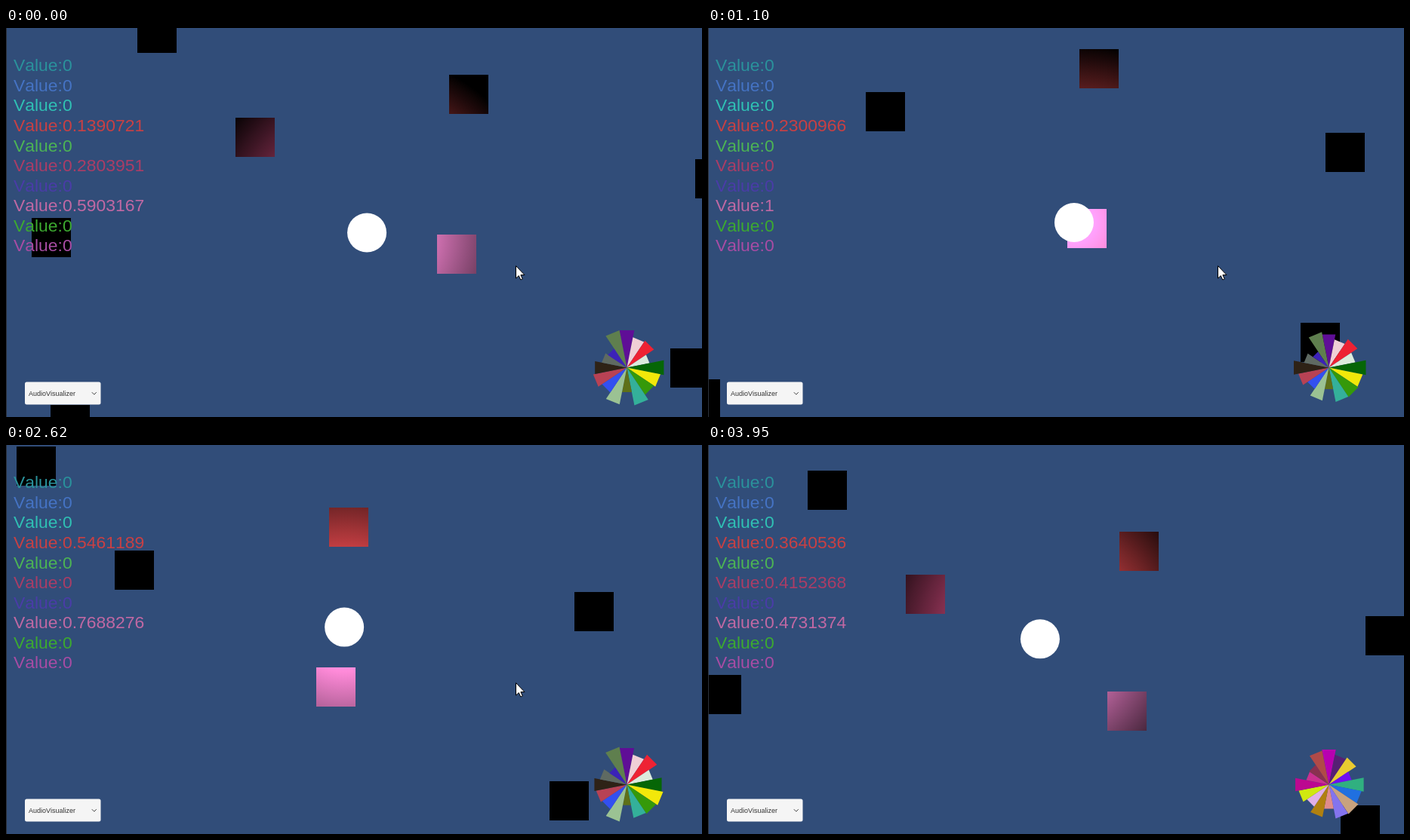
These frames come from a looping animation (922 px wide and 516 px high, 4.02 s). An HTML page with a canvas:

```html
<!DOCTYPE html>
<html lang="en">
<head>
<meta charset="utf-8">
<title>Proximity values</title>
<style>
  html, body { margin: 0; width: 100%; height: 100%; overflow: hidden; background: #314d79; }
  canvas { display: block; }
</style>
</head>
<body>
<canvas id="stage" width="922" height="516"></canvas>
<script>
const ctx = document.getElementById('stage').getContext('2d');
const LOOP = 4020, STEP = 69.3, LAST_STEP = 57;
const SPEED = 0.1005, DAMPING = 0.00444, BOX = 52;
const LIGHT_RANGE = 238;
const RECOLOR_TIME = 3005, POINTER_HIDE_TIME = 3005;

// Steering: [end time, horizontal, vertical]
const steering = [
  [288, 1, 1], [1640, 1, 0], [1918, 1, -1], [1970, 0, -1], [2856, -1, -1], [LOOP, -1, 0]
];

// Cube centres relative to the pink cube; the row links a cube to its text
const cubes = [
  { x: -397, y: -293 }, { x: 16.5, y: -212, row: 3 }, { x: -267, y: -155, row: 5 },
  { x: 342, y: -100.5 }, { x: -537, y: -22 }, { x: 309, y: 151 },
  { x: -512, y: 226 }, { x: 0, y: 0, row: 7 }
];

const rowColors = '#2a929c #4573c4 #2fc0b4 #c84044 #4cb454 #aa3d66 #4a3ca8 #c068a3 #3caa30 #a84ca4'.split(' ');

const wheelColors = [
  '#5f0e96 #f0cfd6 #ee2233 #dcebdd #066606 #f2e80a #35990a #34b09a #5e7018 #9bc293 #3350f0 #b84254 #2e2216 #5f6a62 #3c22b8 #5f7f4e',
  '#b800b0 #562074 #eacb30 #7010f0 #30b080 #2070e0 #c8a27e #8474ee #e08c8c #b08010 #e0b0e8 #d0e810 #bc0890 #cc3090 #8a3050 #b04a48'
].map(list => list.split(' '));

// Mean wedge lengths clockwise from the top
const wheelLengths = [47, 38, 44, 32, 48, 45, 43, 47, 30, 46, 36, 43, 44, 33, 28, 48];

const random = seed => {
  const s = Math.sin(seed * 12.9898) * 43758.5453;
  return s - Math.floor(s);
};

// Player position relative to the pink cube, and its lead over the damped camera
function playerAt(time) {
  const state = { x: -118.8, y: -28.5, leadX: 15.6, leadY: 14 };
  let start = 0;
  for (const [end, h, v] of steering) {
    const dt = Math.min(time, end) - start;
    if (dt <= 0) break;
    const speed = SPEED / Math.hypot(h, v), decay = Math.exp(-DAMPING * dt);
    const goalX = h * speed / DAMPING, goalY = v * speed / DAMPING;
    state.x += h * speed * dt;
    state.y += v * speed * dt;
    state.leadX = goalX + (state.leadX - goalX) * decay;
    state.leadY = goalY + (state.leadY - goalY) * decay;
    start = end;
  }
  return state;
}

// Light fades linearly with distance; bright channels clip
function lightGradient(x, y, color) {
  const channels = [1, 3, 5].map(i => parseInt(color.slice(i, i + 2), 16));
  const gradient = ctx.createRadialGradient(x, y, 0, x, y, LIGHT_RANGE);
  for (let i = 0; i <= 24; i++) {
    const light = (1 - i / 24) * LIGHT_RANGE / 135;
    gradient.addColorStop(i / 24, `rgb(${channels.map(c => Math.min(255, Math.round(c * light)))})`);
  }
  return gradient;
}

function drawWorld(player) {
  const px = 462.5 + player.leadX, py = 257.5 + player.leadY;
  const values = rowColors.map(() => 0);
  for (const { x, y, row } of cubes) {
    const dx = x - player.x, dy = y - player.y;
    ctx.fillStyle = '#000';
    if (row !== undefined) {
      values[row] = Math.min(1, Math.max(0, (260.6 - Math.hypot(dx, dy)) / 234.5));
      ctx.fillStyle = lightGradient(px, py, rowColors[row]);
    }
    ctx.fillRect(Math.round(px + dx - BOX / 2), Math.round(py + dy - BOX / 2), BOX, BOX);
  }
  ctx.fillStyle = '#fff';
  ctx.beginPath();
  ctx.arc(px, py, BOX / 2, 0, Math.PI * 2);
  ctx.fill();
  return values;
}

function drawValues(values) {
  ctx.font = '22.9px "Liberation Sans", Arial, sans-serif';
  values.forEach((value, row) => {
    ctx.fillStyle = rowColors[row];
    ctx.fillText('Value:' + Number(value.toPrecision(7)), 10, 57.2 + row * 26.58);
  });
}

function drawWheel(time) {
  const colors = wheelColors[time < RECOLOR_TIME ? 0 : 1];
  colors.forEach((color, n) => {
    const wobble = Math.sin(time / (200 + 200 * random(n + 1)) + 7 * random(n + 50));
    const length = Math.min(50, wheelLengths[n] + 3 * wobble);
    const half = length * Math.tan(Math.PI / 16);
    ctx.save();
    ctx.translate(822.5, 450.5);
    ctx.rotate(n * Math.PI / 8);
    ctx.fillStyle = color;
    ctx.beginPath();
    ctx.moveTo(0, 0);
    ctx.lineTo(-half, -length);
    ctx.lineTo(half, -length);
    ctx.fill();
    ctx.restore();
  });
}

function drawDropdown() {
  ctx.fillStyle = '#f5f5f5';
  ctx.beginPath();
  ctx.roundRect(25, 469.5, 100.5, 30, 2.5);
  ctx.fill();
  ctx.fillStyle = '#323232';
  ctx.font = '9px "Liberation Sans", Arial, sans-serif';
  ctx.fillText('AudioVisualizer', 30, 488);
  ctx.strokeStyle = '#444';
  ctx.lineWidth = 1;
  ctx.stroke(new Path2D('M113.8 483.2 L116.8 486.2 L119.8 483.2'));
}

const pointer = new Path2D('M675.5 315.5 V332 L679.3 328.6 L681.8 334 L684.3 332.9 L681.9 327.6 H687 Z');
function drawPointer() {
  ctx.fillStyle = '#fff';
  ctx.strokeStyle = '#000';
  ctx.lineWidth = 1;
  ctx.fill(pointer);
  ctx.stroke(pointer);
}

function draw(now) {
  const step = Math.min(LAST_STEP, Math.floor((now % LOOP + 16) / STEP));
  const time = Math.max(0, step * STEP - 8);
  ctx.fontKerning = 'none';
  ctx.fillStyle = '#314d79';
  ctx.fillRect(0, 0, 922, 516);
  drawValues(drawWorld(playerAt(time)));
  drawWheel(time);
  drawDropdown();
  if (time < POINTER_HIDE_TIME) drawPointer();
  ctx.fillStyle = '#2a2f38';
  ctx.fillRect(0, 0, 1, 516);
}

let startTime;
function tick(now) {
  startTime ??= now;
  draw(now - startTime);
  requestAnimationFrame(tick);
}
draw(0);
requestAnimationFrame(tick);
</script>
</body>
</html>
```
